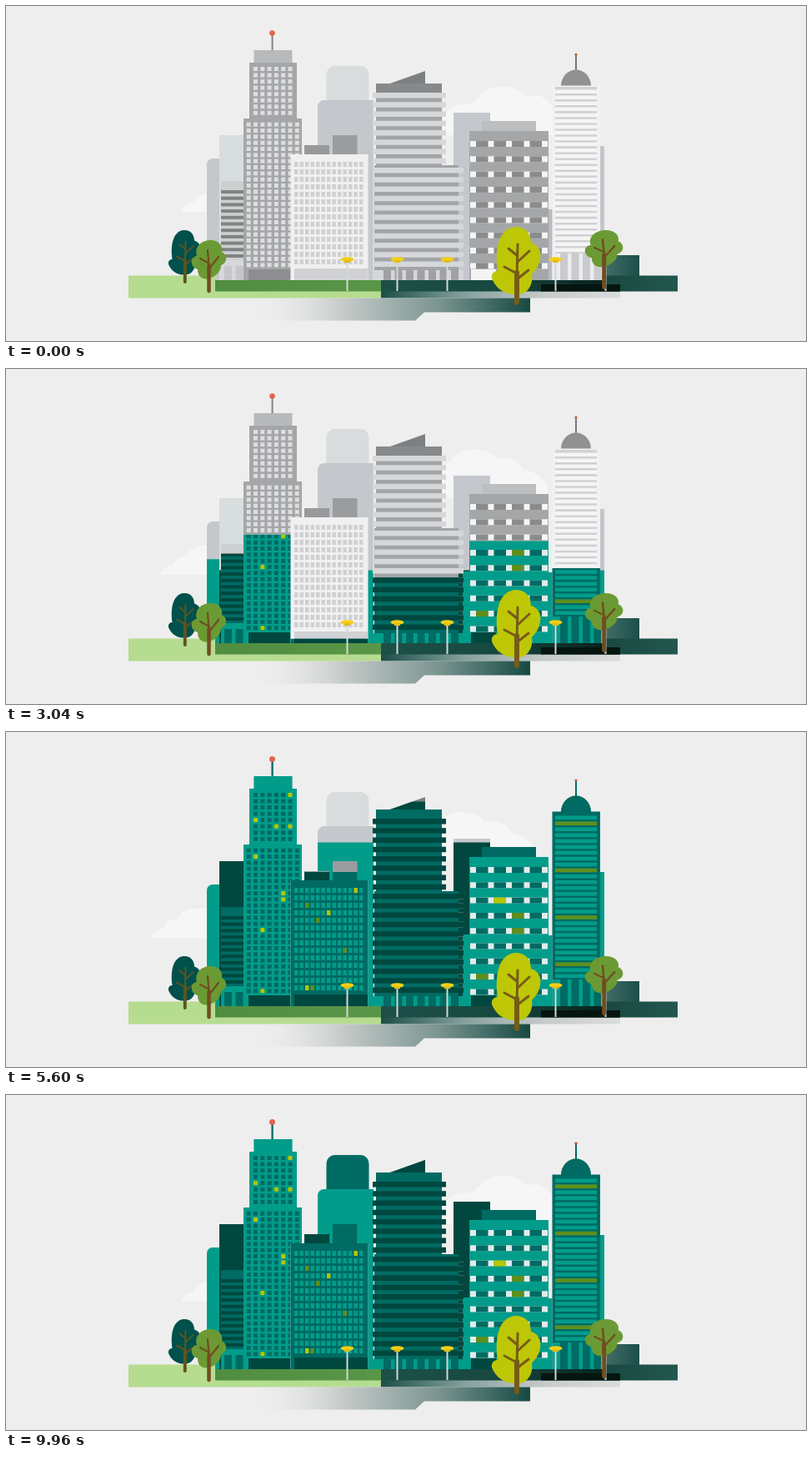
An HTML page with a canvas for the animation above (10 s loop, 960 px wide and 402 px high).

```html
<!DOCTYPE html>
<html lang="en">
<head>
<meta charset="utf-8">
<title>City turning green</title>
<style>
  html, body { margin: 0; width: 100%; height: 100%; overflow: hidden; background: #eee; }
  canvas { display: block; }
</style>
</head>
<body>
<canvas id="stage" width="960" height="402"></canvas>
<script>
const ctx = document.getElementById('stage').getContext('2d');
const LOOP = 10000, FLOOR = 329;
const TEAL = '#029c8b', MID = '#006b63', DARK = '#00483f', LIT = '#b5c800', DIM = '#5f8f1d';
let green = false;

const tone = (grey, tint) => green ? tint : grey;

function rect(color, x, y, right, bottom, radius = 0) {
  ctx.fillStyle = color;
  ctx.beginPath();
  ctx.roundRect(x, y, right - x, bottom - y, radius);
  ctx.fill();
}

function shape(color, d) {
  ctx.fillStyle = color;
  ctx.fill(new Path2D(d));
}

function line(color, width, d) {
  ctx.strokeStyle = color;
  ctx.lineWidth = width;
  ctx.lineCap = 'round';
  ctx.stroke(new Path2D(d));
}

function oval(color, x, y, rx, ry = rx) {
  ctx.fillStyle = color;
  ctx.beginPath();
  ctx.ellipse(x, y, rx, ry, 0, 0, 7);
  ctx.fill();
}

function fade(x0, x1, ...stops) {
  const g = ctx.createLinearGradient(x0, 0, x1, 0);
  stops.forEach((c, i) => g.addColorStop(i / (stops.length - 1), c));
  return g;
}

// Repeats one cell over columns and rows; returns a painter for single lit cells
function grid(color, x, y, w, h, cols, dx, rows, dy) {
  const cell = (fill, c, r) =>
    rect(fill, x + c * dx, y + r * dy, x + c * dx + w, y + r * dy + h);
  for (let r = 0; r < rows; r++)
    for (let c = 0; c < cols; c++) cell(color, c, r);
  return (fill, ...cells) => green && cells.forEach(([c, r]) => cell(fill, c, r));
}

const stripes = (color, x, y, w, h, rows, dy) => grid(color, x, y, w, h, 1, 0, rows, dy);
const bars = (color, x, y, count) => grid(color, x, y, 9, FLOOR - y, count, 13.5, 1, 0);

function leftBlock() {
  rect(tone('#c4c8cc', TEAL), 241, 183, 290, FLOOR, [7, 0, 0, 0]);
}

function backRow() {
  rect(tone('#d8dcdc', MID), 384.5, 72, 435.5, 125, 10);
  rect(tone('#c4c8cc', TEAL), 374, 113, 441, FLOOR, [8, 0, 0, 0]);
  rect(tone('#c4c8cc', DARK), 537, 128, 581, FLOOR);
  rect(tone('#c4c8cc', TEAL), 548, 243, 570, FLOOR);
  rect(tone('#c4c6cb', TEAL), 700, 168, 718, 300);
  rect(tone('#b8bbbf', TEAL), 646, 244, 656, FLOOR);
  rect(tone('#d8dddd', DARK), 256, 155, 290, FLOOR);
}

function stripedBlock() {
  rect(tone('#cdd0d0', MID), 258, 210, 286, 307);
  stripes(tone('#7f8382', DARK), 258, 221, 28, 4, 11, 7.7);
  rect(tone('#d6d7da', TEAL), 258, 305, 286, FLOOR);
  bars(tone('#c4c6c9', MID), 262, 312, 2);
}

function tallTower() {
  const wall = tone('#a5a6a8', TEAL), glass = tone('#dddee0', MID);
  rect(tone('#808285', MID), 318.6, 34, 320.6, 54);
  oval('#e2654d', 319.5, 32.5, 3.3);
  rect(tone('#b8b9bb', TEAL), 297.5, 53, 343.5, 69);
  rect(wall, 292, 68, 349, 136);
  rect(wall, 285, 135, 355, FLOOR);
  const upper = grid(glass, 297, 73, 5, 5, 6, 8.3, 8, 7.55);
  const lower = grid(glass, 288.7, 139.7, 5, 5, 8, 8.3, 24, 7.33);
  upper(LIT, [5, 0], [0, 4], [3, 5], [5, 5]);
  lower(LIT, [1, 1], [5, 7], [5, 8], [2, 13], [2, 23]);
  rect(tone('#8d8e90', DARK), 291, 316, 341, FLOOR);
}

function whiteBlock() {
  rect(tone('#98999b', DARK), 358, 167, 388, 179);
  rect(tone('#9b9c9e', MID), 392, 155, 421.5, 179);
  rect(tone('#f0f0f1', MID), 341.5, 178, 434.5, FLOOR);
  const pane = grid(tone('#cfd0d2', TEAL), 346, 187, 4.4, 6, 13, 6.5, 14, 9);
  pane(LIT, [11, 0], [6, 3], [2, 13]);
  pane(DIM, [2, 2], [4, 4], [9, 8], [3, 13]);
  rect(tone('#d0d1d4', DARK), 346, 315, 434, FLOOR);
}

function centreTower() {
  const core = tone('#a3a4a6', MID), slab = tone('#d6d7d9', DARK);
  shape(tone('#7d8082', DARK), 'M458 94L503 78V94Z');
  rect(core, 444, 93, 523, 192);
  rect(tone('#87898b', MID), 444, 93, 523, 104);
  rect(core, 442, 191, 543, 318);
  for (let i = 0; i < 19; i++) {
    const y = 104 + i * 11.25;
    rect(slab, 440, y, i < 8 ? 528 : 549, y + 6.4);
  }
  rect(tone('#d6d7da', TEAL), 440, 317, 549, FLOOR);
  bars(tone('#a0a1a3', MID), 453, 317, 7);
}

function gridBlock() {
  rect(tone('#bdbebf', MID), 571, 138, 636, 151);
  rect(tone('#a5a6a8', TEAL), 556, 150, 651, FLOOR);
  stripes(tone('#f4f4f4', '#e2ebea'), 557, 162, 93, 7, 9, 18.3);
  const pane = grid(tone('#8a8b8d', MID), 564, 162, 14.5, 7, 4, 21.5, 9, 18.3);
  pane(LIT, [1, 2]);
  pane(DIM, [2, 3], [2, 4], [0, 7]);
  rect(tone('#f4f4f5', DARK), 558, 316, 588, FLOOR);
}

function domeTower() {
  rect(tone('#737679', MID), 683, 59, 685, 78);
  oval('#d9553f', 684, 58, 1.6);
  shape(tone('#8f9193', MID), 'M666 96A18 19.5 0 0 1 702 96Z');
  rect(tone('#f1f1f2', MID), 655.5, 95.5, 713, FLOOR);
  rect(tone('#d0d1d3', MID), 659, 97, 709, 300);
  stripes(tone('#f5f5f6', TEAL), 659, 100.5, 50, 4.5, 28, 7.04);
  if (green) stripes(DIM, 659, 107.5, 50, 4.5, 4, 8 * 7.04);
  rect(tone('#ececee', TEAL), 655.5, 297, 713, FLOOR);
  bars(tone('#cacbcd', MID), 665, 297, 4);
}

// The green edge climbs from the floor to each top: [building, top, start, end, power]
const skyline = [
  [leftBlock, 183, 900, 4000, 1],
  [backRow, 71, 980, 7050, 1],
  [stripedBlock, 209, 824, 3310, 1],
  [tallTower, 28, 1000, 4714, 1.4],
  [whiteBlock, 154, 2755, 5765, 1.5],
  [centreTower, 77, 1620, 5695, 1.1],
  [gridBlock, 137, 740, 4350, 1],
  [domeTower, 55, 1220, 5658, 1.25]
];

function edgeAt(t, top, start, end, power) {
  const u = Math.min(1, Math.max(0, (t - start) / (end - start)));
  return FLOOR - (FLOOR - top) * u ** power;
}

function clouds(t) {
  const drift = (1 - Math.cos(2 * Math.PI * t / LOOP)) / 2;
  const cloud = (range, d) => {
    ctx.save();
    ctx.translate(-range * drift, 0);
    shape('#f6f6f6', d);
    ctx.restore();
  };
  cloud(38, 'M210 247Q214 236 225 236Q229 225 241 225Q248 212 264 212H290V247Z');
  cloud(51, 'M522 142Q526 121 548 118Q562 118 567 110Q577 96.5 597 96.5Q615 97 624 108Q648 104 655 121Q676 124 684 142V155H522Z');
}

function ground() {
  rect('#b6dc90', 147, 323.5, 251, 350.5);
  rect('#b6dc90', 251, 342, 450, 350.5);
  rect(fade(251, 450, '#4f8d40', '#5a9648'), 251, FLOOR, 450, 342.5);
  rect(fade(450, 745, '#1c4e48', '#84a09c', '#c6cbca', '#dcdedd'), 450, 342, 737, 350.5);
  rect(fade(450, 737, '#1d5049', '#174840', '#061c17'), 450, FLOOR, 737, 342.5);
  rect(fade(718, 760, '#446d67', '#1b4f49'), 720, 299, 760, FLOOR);
  rect(fade(718, 806, '#1a4841', '#21574f'), 718, 323.5, 806, 342.5);
  rect('#05150f', 642, 334, 737, 342.5);
  shape(fade(290, 629, '#eeeeee00', '#c6cbca', '#7d9692', '#164a43'),
    'M290 350.5H629V367.5H502L491 377.5H290Z');
}

function lamp(x) {
  rect('#d3d8d7', x - 1, 304, x + 1, 342);
  oval('#f3cf14', x, 304, 8, 2.8);
  rect('#e5bc10', x - 3.5, 305, x + 3.5, 308);
}

const TALL = {
  crown: 'M27 0C41 -1 47 9 47 19C55 21 60 29 58 38C57 49 49 55 48 57C50 69 43 82 30 81C17 82 5 75 0 62C-1 56 3 53 7 53C4 35 5 3 27 0Z',
  branches: 'M30 61L31 21M31 42L45 29M30 56L15 48M31 35L20 26M30 63L44 52',
  trunk: 'M30 55V', stem: 6
};
const ROUND = {
  crown: 'M22 0C31 -1 39 5 37 14C44 17 44 28 36 30C36 39 28 44 22 46C14 48 8 44 8 35C-1 33 -2 20 7 19C4 9 11 1 22 0Z',
  branches: 'M22 37L20 12M22 28L11 22M22 34L33 20',
  trunk: 'M21.5 31V', stem: 4.5
};

function tree(kind, x, y, sx, sy, foot, leaf, bark) {
  ctx.save();
  ctx.translate(x, y);
  ctx.scale(sx, sy);
  shape(leaf, kind.crown);
  line(bark, kind.stem, kind.trunk + (foot - y) / sy);
  line(bark, kind.stem / 2, kind.branches);
  ctx.restore();
}

function draw(now) {
  const t = now % LOOP;
  rect('#eeeeee', 0, 0, 960, 402);
  clouds(t);
  for (const [building, ...climb] of skyline) {
    green = false;
    building();
    green = true;
    ctx.save();
    ctx.beginPath();
    ctx.rect(0, edgeAt(t, ...climb), 960, 402);
    ctx.clip();
    building();
    ctx.restore();
  }
  ground();
  [409.5, 469.5, 529.5, 659.5, 719.5].forEach(lamp);
  tree(TALL, 195, 269, 0.66, 0.66, 331, '#00504b', '#5d5423');
  tree(ROUND, 222, 281, 1, 1, 342, '#6b9a34', '#714d20');
  tree(TALL, 583, 265, 1, 1, 356, '#bdc706', '#775b18');
  tree(ROUND, 694, 269, 1.1, 0.95, 338, '#6b9a34', '#714d20');
  requestAnimationFrame(draw);
}
requestAnimationFrame(draw);
</script>
</body>
</html>
```
